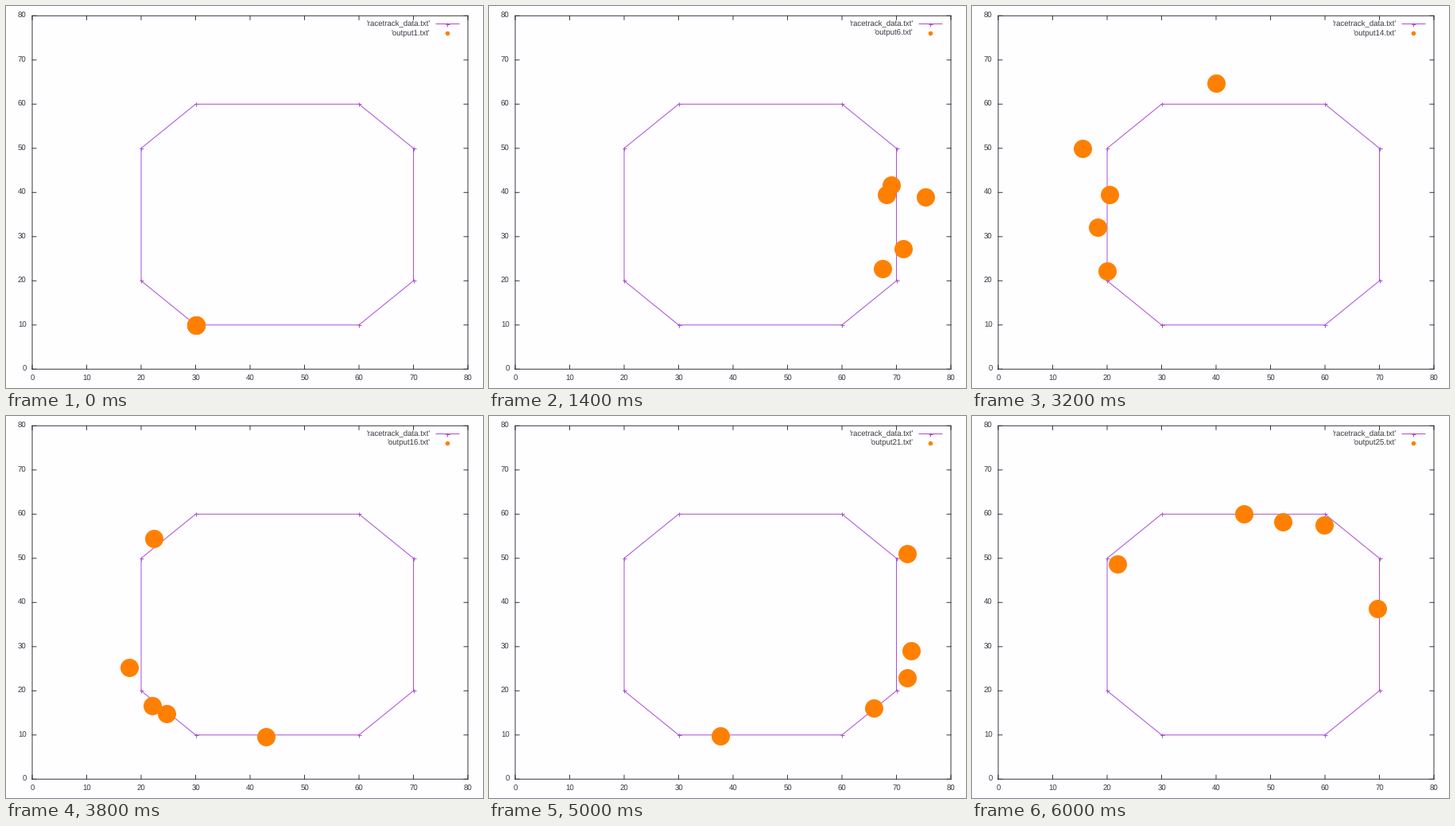
These frames come from a looping animation (600x480 px, 6200 ms). A matplotlib script:

```python
import numpy as np
import matplotlib.pyplot as plt
from matplotlib.animation import FuncAnimation

W, H, DPI = 600, 480, 72
FRAMES, INTERVAL = 62, 100
STEPS = 25
INK, PURPLE, ORANGE = "#3a3a3a", "#aa50d4", "#ff8000"

plt.rcParams.update({
    "font.family": "Liberation Sans",
    "font.size": 9.6,
    "text.hinting": "none",
    "text.color": INK,
    "path.snap": False,
})

START = (30, 10)
TRACK = np.array([START, (60, 10), (70, 20), (70, 50), (60, 60),
                  (30, 60), (20, 50), (20, 20), START], float)
ARC = np.r_[0, np.cumsum(np.hypot(*np.diff(TRACK, axis=0).T))]
LAP = ARC[-1]

# A few key points per car; everything between follows the track
KEY_STEPS = [1, 6, 10, 14, 18, 21, 25]
CARS = [
    [(69, 41.7), (36, 59), (20, 22.3), (68.8, 17.4), (72, 51.1), (21.9, 48.7)],
    [(68.2, 39.5), (40.4, 60), (18.3, 32.1), (43.4, 10.7), (72.7, 29.1), (45.1, 60)],
    [(75.4, 39), (44.4, 61.1), (20.4, 39.5), (40.6, 6.8), (71.9, 23), (52.3, 58.2)],
    [(71.2, 27.2), (47.2, 60), (15.5, 50), (34, 8.8), (65.8, 16.1), (59.8, 57.5)],
    [(67.4, 22.8), (71.8, 49.7), (40, 64.7), (20.6, 31.6), (37.7, 9.8), (69.6, 38.7)],
]


def lerp(t, ts, values):
    return np.stack([np.interp(t, ts, v) for v in values.T], -1)


def on_track(s):
    return lerp(np.mod(s, LAP), ARC, TRACK)


def drive(points):
    """Position at every step: progress along the track plus drift off it."""
    xy = np.array([START] + points, float)
    grid = np.linspace(0, LAP, 4000, endpoint=False)
    gap = np.linalg.norm(xy[:, None] - on_track(grid), axis=2)
    s = np.unwrap(grid[gap.argmin(1)], period=LAP)
    steps = np.arange(1, STEPS + 1)
    drift = lerp(steps, KEY_STEPS, xy - on_track(s))
    return on_track(np.interp(steps, KEY_STEPS, s)) + drift


def px(x):
    return 33 + 6.85 * np.asarray(x)


def py(y):
    return 456.3 - 5.55 * np.asarray(y)


paths = np.array([drive(c) for c in CARS])

fig = plt.figure(figsize=(W / DPI, H / DPI), dpi=DPI, facecolor="#fefdff")
ax = fig.add_axes([0, 0, 1, 1])
ax.set(xlim=(0, W), ylim=(H, 0))
ax.axis("off")


def line(xs, ys, color=INK, **kw):
    return ax.plot(xs, ys, color=color, lw=1, **kw)[0]


def label(x, y, text, ha="right"):
    return ax.text(x, y, text, ha=ha, va="baseline")


left, right, bottom, top = px(0), px(80), py(0), py(80)
line([left, right, right, left, left], [bottom, bottom, top, top, bottom])
for v in range(0, 81, 10):
    x, y = px(v), py(v)
    for edge, d in ((bottom, -5), (top, 5)):
        line([x, x], [edge, edge + d])
    for edge, d in ((left, 5), (right, -5)):
        line([edge, edge + d], [y, y])
    label(x, 471, str(v), "center")
    label(25.5, y + 3, str(v))

plus = dict(marker="+", ms=5, mew=1)
line(px(TRACK[:, 0]), py(TRACK[:, 1]), PURPLE, **plus)
label(533.5, 25.3, "'racetrack_data.txt'")
line([541, 555, 570], [22.5] * 3, PURPLE, markevery=[1], **plus)

name = label(533.5, 36.8, "")
dot = dict(ls="", marker="o", mew=0, zorder=5)
line([555], [34.3], ORANGE, ms=5.6, **dot)
cars = line([], [], ORANGE, ms=23, **dot)


def draw(frame):
    # each step lasts two and a half frames
    k = min((2 * frame + 1) // 5, STEPS - 1)
    cars.set_data(px(paths[:, k, 0]), py(paths[:, k, 1]))
    name.set_text(f"'output{k + 1}.txt'")
    return cars, name


anim = FuncAnimation(fig, draw, frames=FRAMES, interval=INTERVAL, repeat=True)
plt.show()
```
